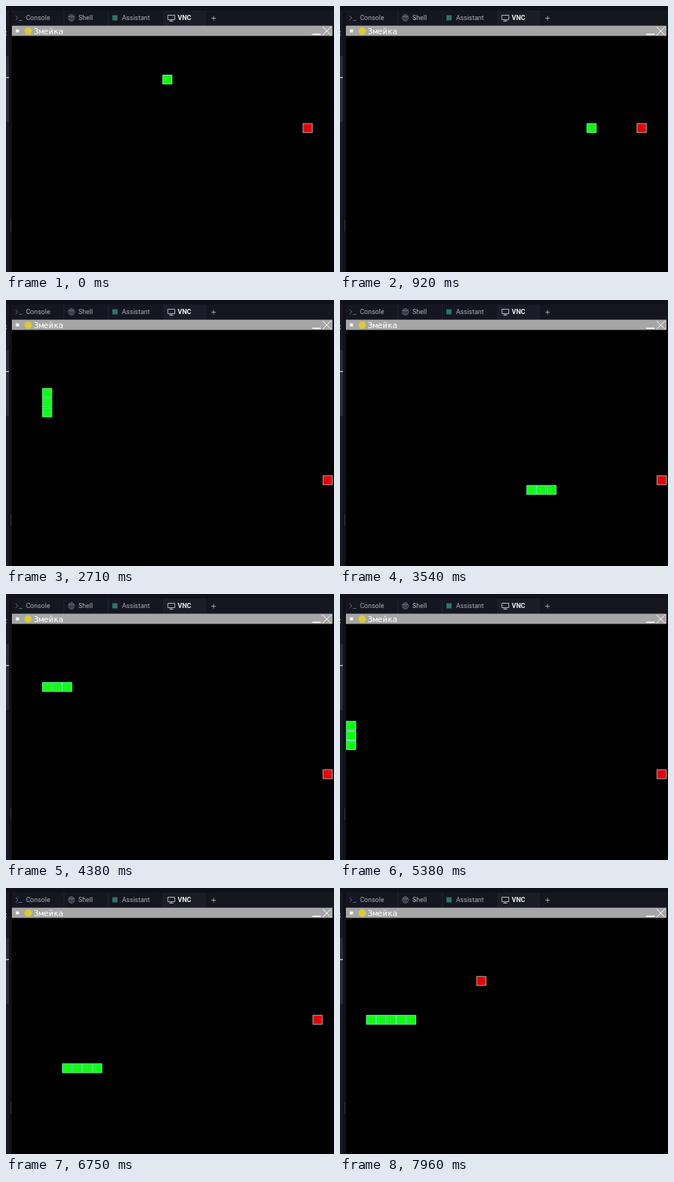
An HTML page for the animation above (8000 ms loop, 444 by 360 pixels).

```html
<!DOCTYPE html>
<html lang="ru">
<head>
<meta charset="utf-8">
<title>Змейка</title>
<style>
  html, body { margin: 0; width: 100%; height: 100%; overflow: hidden; background: #0e0f17; }
  svg { display: block; width: 444px; height: 360px; }
  .tab { font: 9px Roboto, "Noto Sans", sans-serif; fill: #abaeb7; }
  .active { font-weight: 700; fill: #f2f3f5; }
  .title { font: 11.1px "DejaVu Sans Mono", monospace; fill: #fff; }
  .icon { fill: none; stroke: #6c707b; stroke-width: .9; }
  .white { fill: none; stroke: #fff; }
</style>
</head>
<body>
<svg viewBox="0 0 444 360">
  <rect width="444" height="360" fill="#10111a"/>
  <rect x="8" y="6" width="436" height="21" fill="#151720"/>
  <rect x="214" y="6" width="55" height="21" fill="#1a1c26"/>
  <path d="M78.5 6V27M138.5 6V27M213.5 6V27M269.5 6V27" stroke="#20232e"/>

  <!-- left gutter -->
  <rect y="6" width="4" height="354" fill="#171922"/>
  <rect y="68" width="4" height="89" fill="#2a2c36"/>
  <rect y="96" width="4" height="1.5" fill="#b5b7bd"/>
  <path d="M.5 34V35.5M.5 38V39.5" stroke="#7d818c"/>
  <path d="M6.5 290V305" stroke="#30333e"/>

  <!-- tabs -->
  <path class="icon" d="M13 13l3 3-3 3M17.5 19.5H22"/>
  <text class="tab" x="27" y="19">Console</text>
  <g class="icon">
    <circle cx="88.5" cy="16" r="4.3"/>
    <path d="M88.5 11.7V20.3M86.5 12.5V19.5M90.5 12.5V19.5M85 14.5H92"/>
  </g>
  <text class="tab" x="98" y="19">Shell</text>
  <rect x="144" y="12.5" width="7" height="7" fill="#2c7468"/>
  <text class="tab" x="157" y="19">Assistant</text>
  <path class="icon" style="stroke:#c6c8ce" d="M219 12.5H228.5V18.5H219ZM223.7 18.5V20.5M221 20.5H226.5"/>
  <text class="tab active" x="232.5" y="19">VNC</text>
  <path d="M278 16.5H284M281 13.5V19.5" stroke="#abaeb7" stroke-width=".9"/>

  <!-- game window -->
  <rect x="8" y="26.6" width="436" height="334" fill="#000"/>
  <rect x="8" y="26.6" width="434" height="13.9" fill="#a6a6a6"/>
  <rect x="13.5" y="31.7" width="4" height="4" fill="#fff"/>
  <circle cx="30" cy="34" r="5" fill="#dccb32"/>
  <text class="title" x="37.5" y="37.8">Змейка</text>
  <path class="white" stroke-width="1.5" d="M414.5 38.3H426"/>
  <path class="white" d="M428.5 28.2L440 39.7M440 28.2L428.5 39.7"/>
  <g id="board"></g>
</svg>
<script>
const COLS = 32, ROWS = 24, LEFT = 8.2, TOP = 40.5;
const CELL_W = 434 / COLS, CELL_H = 315 / ROWS, BORDER = 1;
const LOOP = 8000, FPS = 24;
const DIRS = { L: [-1, 0], R: [1, 0], U: [0, -1], D: [0, 1] };
const START = [15, 4];
const FOODS = [[29, 9], [8, 4], [31, 15], [30, 10], [13, 6]];

// [end tick, moves made up to that tick]
const LEGS = [
  [20, 'L5 D7 R12 U2'],
  [42, 'R21 U6 L2'],
  [65, 'L4 D1 R7 U2 L9 D6'],
  [80, 'D8 R11'],
  [105, 'R19 U10 R4'],
  [129, 'R27 D6'],
  [162, 'D4 R29 U1 R11'],
  [180, 'R13 U5 R3'],
  [191, 'R14'],
];

const path = [START];
const eaten = [0];
const marks = [[0, 0]];
for (const [tick, moves] of LEGS) {
  for (const move of moves.split(' ')) {
    const [dx, dy] = DIRS[move[0]];
    for (let n = +move.slice(1); n > 0; n--) {
      const [x, y] = path.at(-1);
      const head = [(x + dx + COLS) % COLS, (y + dy + ROWS) % ROWS];
      const score = eaten.at(-1);
      const food = FOODS[score];
      path.push(head);
      eaten.push(score + (head[0] === food[0] && head[1] === food[1]));
    }
  }
  marks.push([tick, path.length - 1]);
}

function headIndex(tick) {
  const i = marks.findIndex(([end]) => tick <= end);
  if (i < 0) return path.length - 1;
  if (i === 0) return 0;
  const [t0, n0] = marks[i - 1], [t1, n1] = marks[i];
  return Math.floor(n0 + (n1 - n0) * (tick - t0) / (t1 - t0) + 1e-6);
}

const board = document.getElementById('board');

function addRect(parent, inset, fill) {
  const rect = document.createElementNS('http://www.w3.org/2000/svg', 'rect');
  const attrs = { x: inset, y: inset, width: CELL_W - 2 * inset, height: CELL_H - 2 * inset, fill };
  for (const name in attrs) rect.setAttribute(name, attrs[name]);
  parent.append(rect);
}

function makeCell(border, fill) {
  const cell = document.createElementNS('http://www.w3.org/2000/svg', 'g');
  addRect(cell, 0, border);
  addRect(cell, BORDER, fill);
  board.append(cell);
  return cell;
}

function place(cell, [x, y]) {
  cell.setAttribute('transform', `translate(${LEFT + x * CELL_W} ${TOP + y * CELL_H})`);
}

const food = makeCell('#b8a6a6', '#e80000');
const body = FOODS.map(() => makeCell('#5cf8a4', '#10ff10'));

function draw(now) {
  const tick = Math.floor((now % LOOP) * FPS / 1000 + .05);
  const head = headIndex(tick);
  place(food, FOODS[eaten[head]]);
  body.forEach((cell, i) => {
    const shown = i <= eaten[head] && i <= head;
    cell.style.display = shown ? '' : 'none';
    if (shown) place(cell, path[head - i]);
  });
}

const begin = performance.now();
function loop() {
  draw(performance.now() - begin);
  requestAnimationFrame(loop);
}
loop();
</script>
</body>
</html>
```
